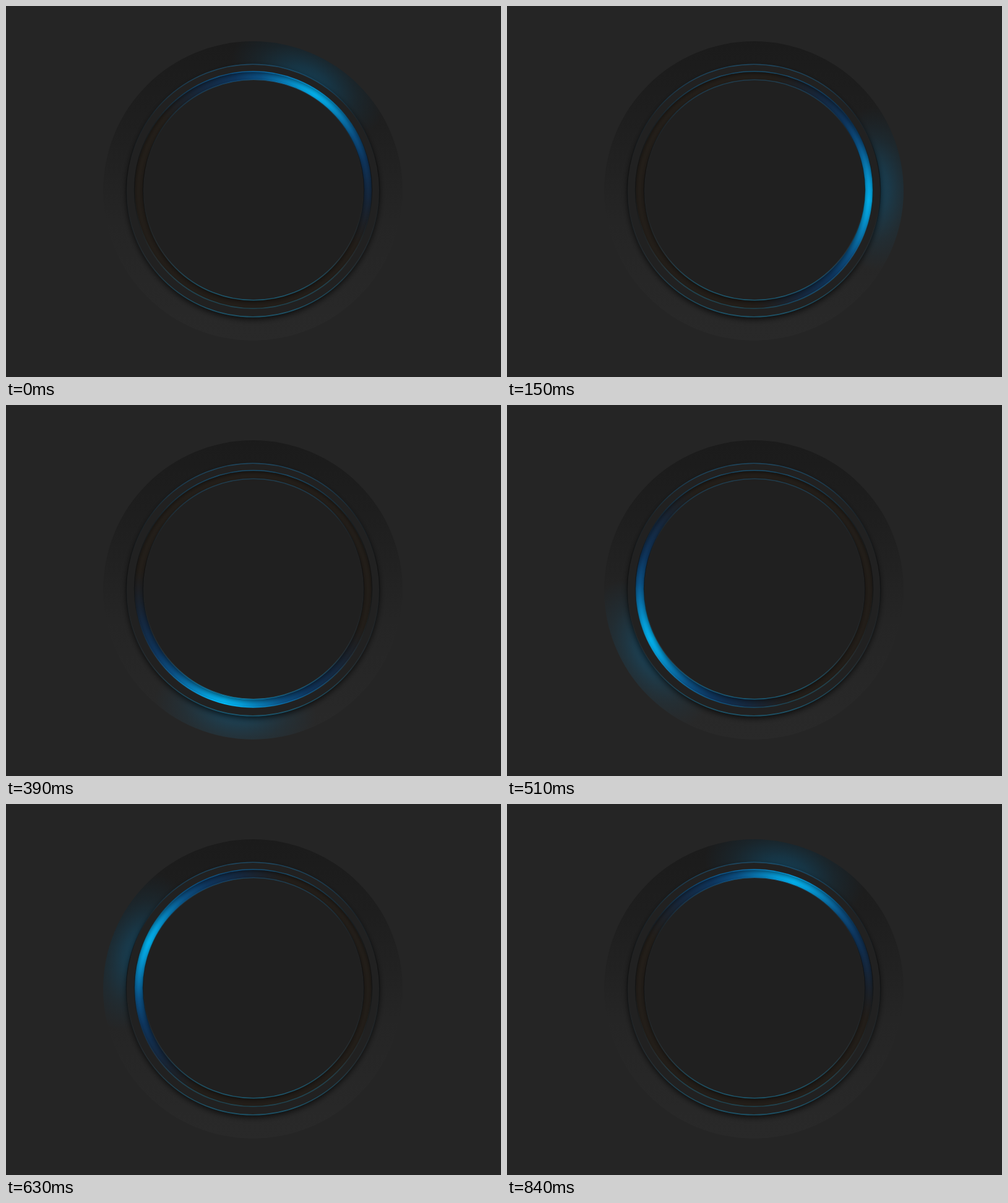
An HTML page with a canvas that plays this animation: 800 px wide and 600 px high, repeating every 0.87 s.

```html
<!DOCTYPE html>
<html lang="en">
<head>
<meta charset="utf-8">
<title>Ring light</title>
<style>
  html, body { margin: 0; width: 100%; height: 100%; overflow: hidden; background: #252525; }
  canvas { display: block; }
</style>
</head>
<body>
<canvas id="stage" width="800" height="600"></canvas>
<script>
const ctx = document.getElementById('stage').getContext('2d');
const LOOP = 870, STEP = 30, TAU = Math.PI * 2;
const rad = degrees => degrees * Math.PI / 180;

const plate = { x: 399, y: 299, r: 242 };
const rim = { x: 399, y: 298.5, r: 204.5 };
const groove = { x: 399.5, y: 297.5, r: 192 };
const face = { x: 400, y: 297.5, r: 178.5 };

// Light falloff: degrees away from the peak, then colour.
const falloff = [
  [0, 'rgb(4,184,246)'], [8, 'rgb(6,166,228)'], [18, 'rgb(9,126,186)'],
  [29, 'rgb(12,84,138)'], [42, 'rgb(15,56,98)'], [60, 'rgba(18,45,78,.75)'],
  [85, 'rgba(22,36,56,0)']
];

function trace({ x, y, r }, grow = 0) {
  ctx.beginPath();
  ctx.arc(x, y, r + grow, 0, TAU);
}

function disc(circle, fill) {
  trace(circle);
  ctx.fillStyle = fill;
  ctx.fill();
}

function vertical({ y, r }, stops) {
  const gradient = ctx.createLinearGradient(0, y - r, 0, y + r);
  stops.forEach(([at, color]) => gradient.addColorStop(at, color));
  return gradient;
}

function within(draw) {
  ctx.save();
  draw();
  ctx.restore();
}

function shadow(alpha, blur, dy) {
  ctx.shadowColor = `rgba(0,0,0,${alpha})`;
  ctx.shadowBlur = blur;
  ctx.shadowOffsetY = dy;
}

function raised(circle, fill, alpha, blur, dy) {
  within(() => {
    shadow(alpha, blur, dy);
    disc(circle, fill);
  });
}

// Dark along the sides, teal at the top and bottom.
function edge(circle, top, bottom) {
  within(() => {
    trace(circle);
    ctx.lineWidth = 1.4;
    ctx.strokeStyle = vertical(circle, [
      [0, 'rgba(0,0,0,0)'], [.3, 'rgba(0,0,0,.4)'], [.5, 'rgba(0,0,0,.6)'],
      [.75, 'rgba(0,0,0,.25)'], [1, 'rgba(0,0,0,0)']
    ]);
    ctx.stroke();
    trace(circle, -.2);
    ctx.globalCompositeOperation = 'lighter';
    ctx.lineWidth = 1.6;
    ctx.strokeStyle = vertical(circle, [
      [0, `rgba(0,92,148,${top})`], [.2, 'rgba(8,24,34,.6)'], [.4, 'rgba(16,16,16,.4)'],
      [.8, 'rgba(16,28,34,.8)'], [1, `rgba(0,106,148,${bottom})`]
    ]);
    ctx.stroke();
  });
}

function halo(angle) {
  within(() => {
    trace(plate);
    ctx.clip();
    ctx.translate(rim.x, rim.y);
    ctx.rotate(angle);
    ctx.translate(195, 0);
    ctx.scale(.6, 1);
    const gradient = ctx.createRadialGradient(0, 0, 0, 0, 0, 132);
    gradient.addColorStop(0, 'rgba(10,106,156,.44)');
    gradient.addColorStop(.3, 'rgba(12,100,146,.34)');
    gradient.addColorStop(.65, 'rgba(14,90,130,.14)');
    gradient.addColorStop(1, 'rgba(14,80,120,0)');
    disc({ x: 0, y: 0, r: 132 }, gradient);
  });
}

function light(angle) {
  const gradient = ctx.createConicGradient(angle - Math.PI, groove.x, groove.y);
  falloff.forEach(([offset, color]) => {
    gradient.addColorStop(.5 - offset / 360, color);
    gradient.addColorStop(.5 + offset / 360, color);
  });
  disc(groove, gradient);
}

function grooveShade() {
  within(() => {
    trace(groove);
    ctx.clip();
    shadow(.6, 8, 3);
    trace(groove, 5.5);
    ctx.lineWidth = 10;
    ctx.strokeStyle = '#181818';
    ctx.stroke();
  });
}

function draw(time) {
  const tick = Math.floor(time % LOOP / STEP) * STEP;
  const angle = rad(33 + 360 * tick / LOOP - 90);

  ctx.fillStyle = '#252525';
  ctx.fillRect(0, 0, 800, 600);
  disc(plate, vertical(plate, [
    [0, '#1b1b1b'], [.25, '#1e1e1e'], [.5, '#232323'], [.6, '#252525'], [1, '#292929']
  ]));
  halo(angle - rad(6));

  raised(rim, '#212121', .65, 10, 4);
  edge(rim, .42, .52);

  disc(groove, '#25201b');
  light(angle);
  grooveShade();
  edge(groove, .58, .36);

  raised(face, '#202020', .6, 8, 3);
  edge(face, .32, .55);
}

function play(now) {
  draw(now);
  requestAnimationFrame(play);
}

draw(0);
requestAnimationFrame(play);
</script>
</body>
</html>
```
